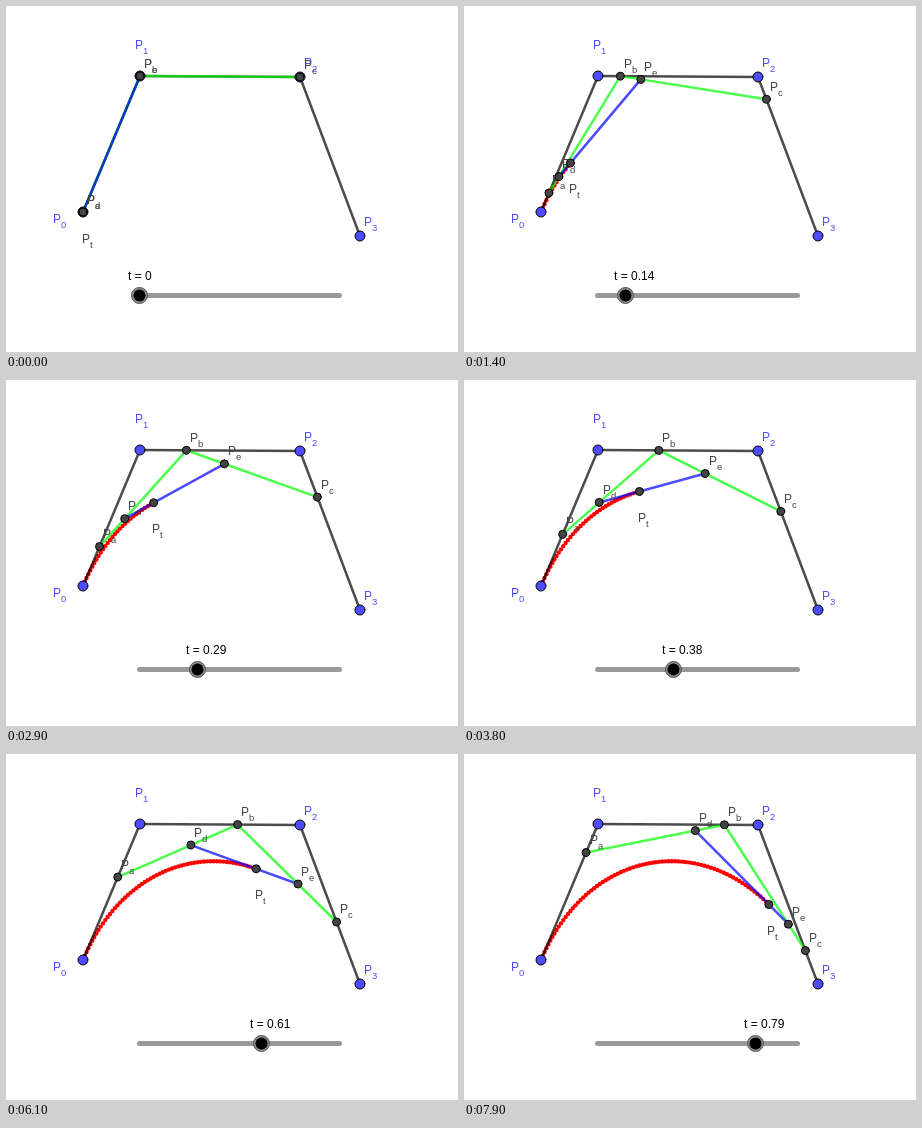
Recreate the animation shown at these times as an HTML page with a canvas. Size 452 px wide and 346 px high, loop 8000 ms.

```html
<!DOCTYPE html>
<html lang="en">
<head>
<meta charset="utf-8">
<title>Cubic Bézier construction</title>
<style>
html, body { margin: 0; width: 100%; height: 100%; overflow: hidden; background: #fff; }
canvas { display: block; }
</style>
</head>
<body>
<canvas id="stage" width="452" height="346"></canvas>
<script>
const ctx = document.getElementById('stage').getContext('2d');
const STEP = 100, STEPS = 80;
const BLUE = '#4d4dff', DARK = '#444';
const FONT = '"Liberation Sans", Arial, sans-serif';
const P = [[77, 206], [134, 70], [294, 71], [354, 230]];
const LABELS = [[-30, 11], [-5, -27], [4, -10], [4, -10]];

const mix = (p, q, t) => [p[0] + (q[0] - p[0]) * t, p[1] + (q[1] - p[1]) * t];

// De Casteljau construction at t
function construct(t) {
  const a = mix(P[0], P[1], t), b = mix(P[1], P[2], t), c = mix(P[2], P[3], t);
  const d = mix(a, b, t), e = mix(b, c, t);
  return { a, b, c, d, e, t: mix(d, e, t) };
}

function line(color, ...pts) {
  ctx.strokeStyle = color;
  ctx.lineWidth = 2.5;
  ctx.lineCap = ctx.lineJoin = 'round';
  ctx.beginPath();
  pts.forEach(p => ctx.lineTo(p[0], p[1]));
  ctx.stroke();
}

function disc([x, y], r, fill, stroke) {
  ctx.beginPath();
  ctx.arc(x, y, r, 0, Math.PI * 2);
  ctx.fillStyle = fill;
  ctx.fill();
  if (stroke) {
    ctx.strokeStyle = stroke;
    ctx.lineWidth = 1;
    ctx.stroke();
  }
}

function text(str, x, y, size, color) {
  ctx.font = size + 'px ' + FONT;
  ctx.fillStyle = color;
  ctx.fillText(str, x, y);
}

function point(p, r, color, sub, [dx, dy]) {
  disc(p, r, color, '#000');
  const x = Math.floor(p[0] + dx), y = Math.floor(p[1] + dy);
  text('P', x, y, 12, color);
  text(sub, x + 8, y + 5, 9.5, color);
}

function slider(t) {
  const x = 133.5 + 200 * t, y = 289.5;
  ctx.strokeStyle = '#999';
  ctx.lineWidth = 5;
  ctx.lineCap = 'round';
  ctx.beginPath();
  ctx.moveTo(133.5, y);
  ctx.lineTo(333.5, y);
  ctx.stroke();
  disc([x, y], 8, '#8c8c8c', '#555');
  disc([x, y], 6, '#000');
  text('t = ' + t, Math.floor(x - 11.5), 274, 12, '#000');
}

function draw(n) {
  const t = n / 100, k = construct(t);
  ctx.fillStyle = '#fff';
  ctx.fillRect(0, 0, 452, 346);

  for (let i = 0; i <= n; i++) disc(construct(i / 100).t, 2.2, '#f00');

  const black = 'rgba(0,0,0,.7)', green = 'rgba(0,255,0,.7)';
  for (let i = 0; i < 3; i++) line(black, P[i], P[i + 1]);
  line(green, k.a, k.b);
  line(green, k.b, k.c);
  line('rgba(0,0,255,.7)', k.d, k.e);

  P.forEach((p, i) => point(p, 5, BLUE, String(i), LABELS[i]));
  for (const name of 'abcde') point(k[name], 4, DARK, name, [4, -8]);
  point(k.t, 4, DARK, 't', [-1, 31]);
  slider(t);
}

const start = performance.now();
function tick() {
  draw(Math.floor((performance.now() - start) / STEP) % STEPS);
  requestAnimationFrame(tick);
}
tick();
</script>
</body>
</html>
```
